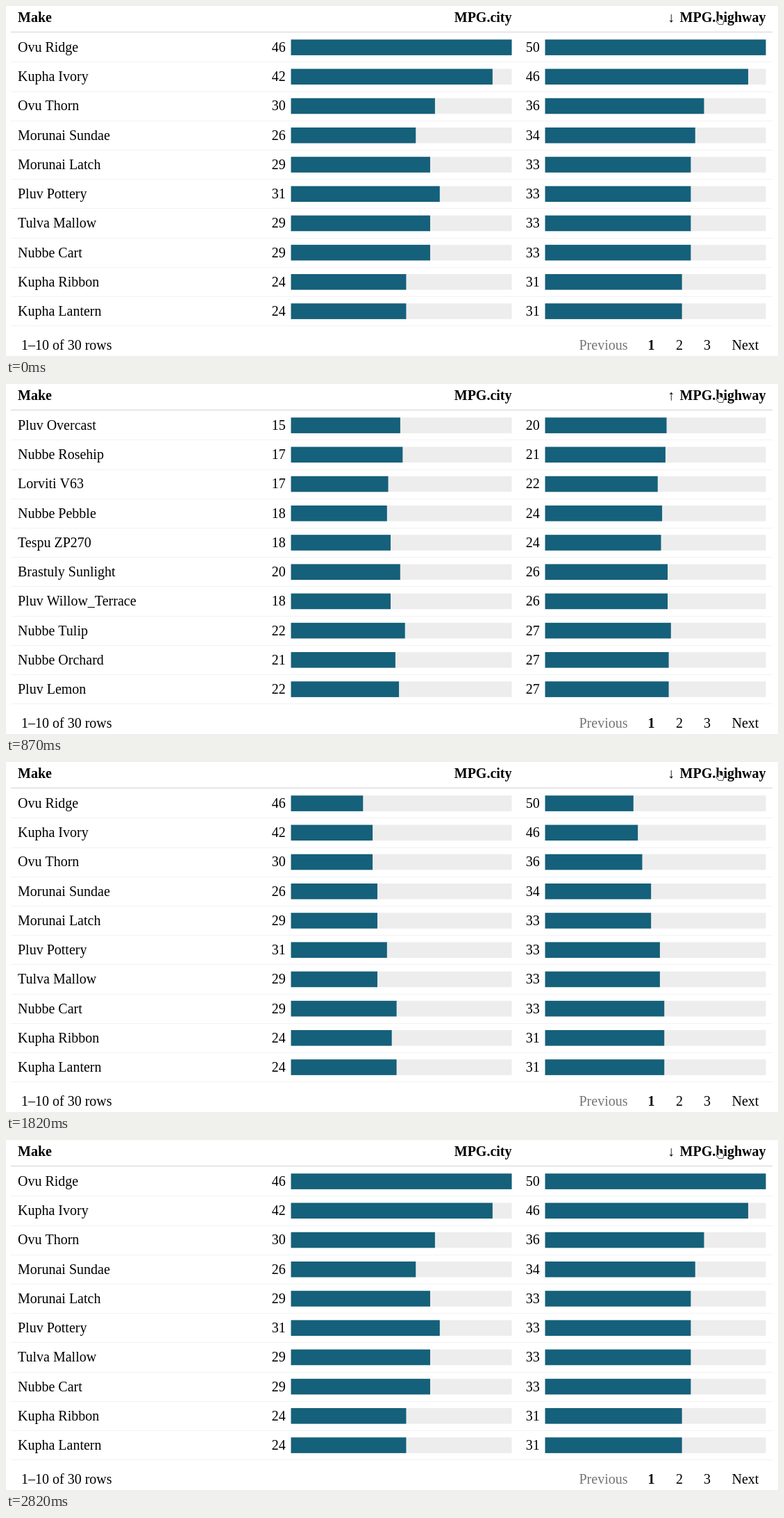
An HTML page with a canvas that plays this animation: 1112 px wide and 504 px high, repeating every 3.28 s.

```html
<!DOCTYPE html>
<html lang="en">
<head>
<meta charset="utf-8">
<title>Sorted table with bars</title>
<style>
html, body { margin: 0; width: 100%; height: 100%; overflow: hidden; background: #fff; }
canvas { display: block; width: 1112px; height: 504px; }
</style>
</head>
<body>
<canvas id="stage" width="1112" height="504"></canvas>
<script>
const ctx = document.getElementById('stage').getContext('2d');
const LOOP = 3280, TICK = 200 / 3, ROW = 42.22, BAR = 318;
const FACE = '20px "Liberation Serif", "Times New Roman", serif';

const descending = {
  arrow: '↓',
  names: ['Ovu Ridge', 'Kupha Ivory', 'Ovu Thorn', 'Morunai Sundae', 'Morunai Latch',
    'Pluv Pottery', 'Tulva Mallow', 'Nubbe Cart', 'Kupha Ribbon', 'Kupha Lantern'],
  city: [46, 42, 30, 26, 29, 31, 29, 29, 24, 24],
  highway: [50, 46, 36, 34, 33, 33, 33, 33, 31, 31]
};
const ascending = {
  arrow: '↑',
  names: ['Pluv Overcast', 'Nubbe Rosehip', 'Lorviti V63', 'Nubbe Pebble', 'Tespu ZP270',
    'Brastuly Sunlight', 'Pluv Willow_Terrace', 'Nubbe Tulip', 'Nubbe Orchard', 'Pluv Lemon'],
  city: [15, 17, 17, 18, 18, 20, 18, 22, 21, 22],
  highway: [20, 21, 22, 24, 24, 26, 26, 27, 27, 27]
};
const columns = [
  { key: 'city', x: 410.5, max: 46 },
  { key: 'highway', x: 776.5, max: 50 }
];
// Each click re-sorts the table; the bars start to move after the lag.
const clicks = [
  { at: 330, lag: 82, from: descending, to: ascending },
  { at: 1750, lag: 66, from: ascending, to: descending }
];

// cubic-bezier(.25, .1, .25, 1)
function ease(x) {
  if (x <= 0) return 0;
  if (x >= 1) return 1;
  let lo = 0, hi = 1, s;
  for (let i = 0; i < 24; i++) {
    s = (lo + hi) / 2;
    if (0.75 * s * (1 - s) + s ** 3 < x) lo = s; else hi = s;
  }
  return 0.3 * s * (1 - s) ** 2 + 3 * s * s * (1 - s) + s ** 3;
}

function text(str, x, y, align = 'left', bold = false, color = '#000') {
  ctx.font = (bold ? 'bold ' : '') + FACE;
  ctx.textAlign = align;
  ctx.fillStyle = color;
  ctx.fillText(str, x, y);
}

function rect(x, y, w, h, color) {
  ctx.fillStyle = color;
  ctx.fillRect(x, y, w, h);
}

function hand() {
  const p = new Path2D('M1026 22V14.5q1.2-1.6 2.4 0V18.5l4.4 1q1 .4 1 1.6l-1 5.4h-6.2l-3.6-4.6q.2-1.6 1.6-.9z');
  ctx.fillStyle = '#fff';
  ctx.fill(p);
  ctx.strokeStyle = '#222';
  ctx.lineWidth = 0.8;
  ctx.stroke(p);
}

function draw(t) {
  const click = t < clicks[1].at - 4 ? clicks[0] : clicks[1];
  const elapsed = Math.floor((t - click.at + 4) / TICK) * TICK - click.lag;
  const p = ease(elapsed / 1000);
  const view = elapsed >= 0 ? click.to : click.from;

  rect(0, 0, 1112, 504, '#fff');
  text('Make', 17, 23, 'left', true);
  text('MPG.city', 728.5, 23, 'right', true);
  text('MPG.highway', 1094.5, 23, 'right', true);
  text(view.arrow, 958, 23, 'center', true);
  rect(7, 36.5, 1097, 2.1, '#e6e6e6');

  view.names.forEach((name, i) => {
    const y = i * ROW, base = Math.round(66 + y);
    text(name, 17, base);
    for (const { key, x, max } of columns) {
      const a = click.from[key][i], b = click.to[key][i];
      text(view[key][i], x - 7.7, base, 'right');
      rect(x, 48.3 + y, BAR, 22.6, '#ededed');
      rect(x, 48.3 + y, BAR * (a + (b - a) * p) / max, 22.6, '#15607a');
    }
    rect(7, Math.round(80.3 + y), 1097, 1, '#f2f2f2');
  });

  text('1–10 of 30 rows', 22, 495);
  text('Previous', 825.5, 495, 'left', false, '#757575');
  text('1', 929.5, 495, 'center', true);
  text('2', 970, 495, 'center');
  text('3', 1010, 495, 'center');
  text('Next', 1045.5, 495);
  hand();
}

const start = performance.now();
function frame(now) {
  draw(Math.max(0, now - start) % LOOP);
  requestAnimationFrame(frame);
}
draw(0);
requestAnimationFrame(frame);
</script>
</body>
</html>
```
